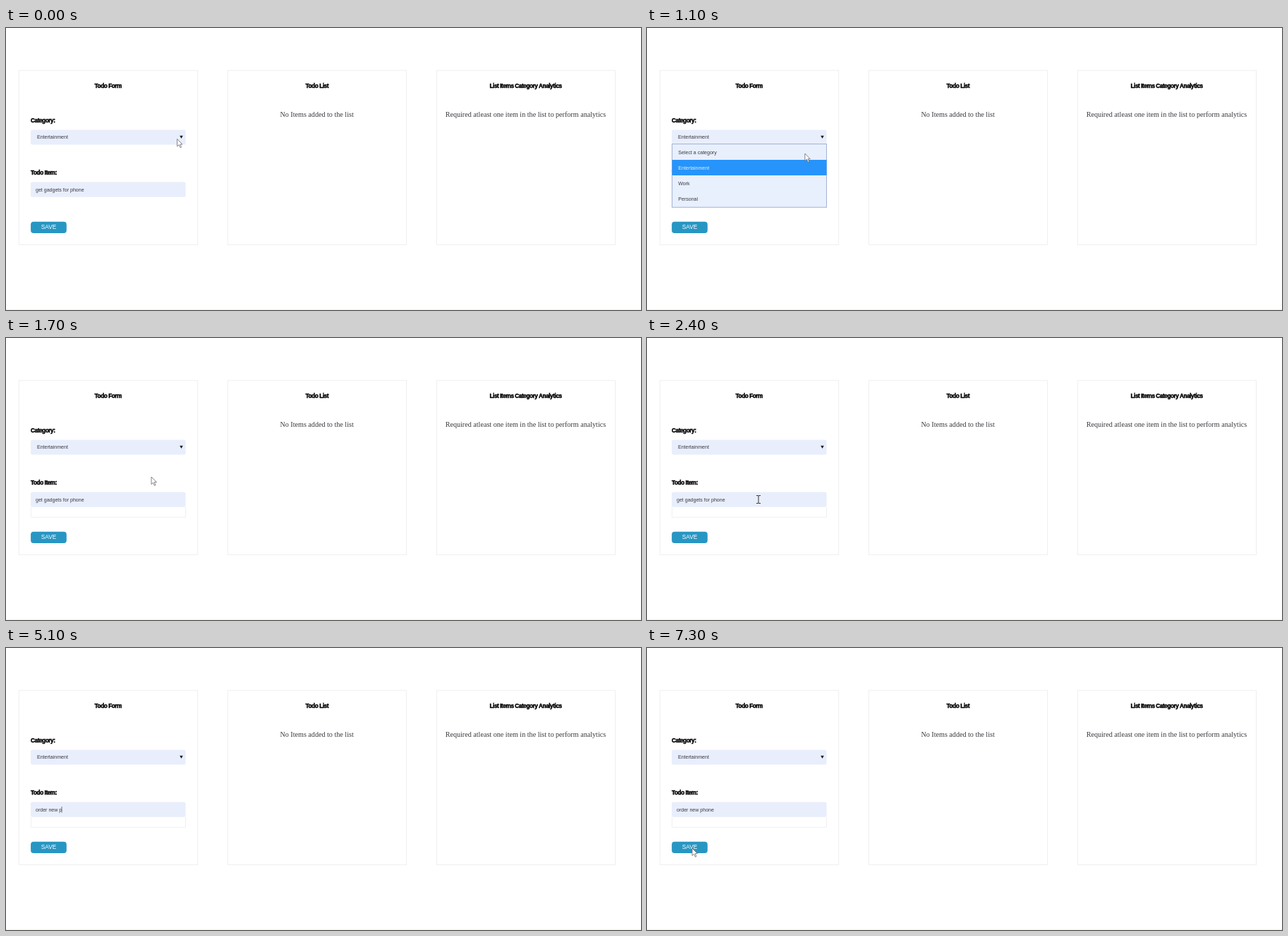
Animation of 900 by 400 pixels, one loop 8 s. Source, as an HTML page:

```html
<!DOCTYPE html>
<html lang="en">
<head>
<meta charset="utf-8">
<title>Todo form</title>
<style>
  html, body { margin: 0; width: 100%; height: 100%; overflow: hidden; background: #fff; }
  svg { display: block; width: 100%; height: 100%; }
  text { font: 7.05px "Liberation Sans", Arial, sans-serif; fill: #3a3a40; white-space: pre; }
  .title { font-size: 8.2px; font-weight: bold; letter-spacing: -.42px; fill: #000; stroke: #000; stroke-width: .45px; }
  .note { font: 10.15px "Liberation Serif", Times, serif; }
  .middle { text-anchor: middle; }
  .field { fill: #e8eefc; }
  .card { fill: none; stroke: #efefef; }
</style>
</head>
<body>
<svg viewBox="0 0 900 400">
  <rect y="398.6" width="900" height="1.4" fill="#f7f7e2"/>

  <rect class="card" x="18.3" y="60.2" width="253.4" height="247.2"/>
  <rect class="card" x="314.3" y="60.2" width="253.2" height="247.2"/>
  <rect class="card" x="610.3" y="60.2" width="253.2" height="247.2"/>
  <text class="title middle" x="144.8" y="85.3">Todo Form</text>
  <text class="title middle" x="440.8" y="85.3">Todo List</text>
  <text class="title middle" x="736.6" y="85.3">List Items Category Analytics</text>
  <text class="note middle" x="440.6" y="125.5">No Items added to the list</text>
  <text class="note middle" x="736.4" y="125.5">Required atleast one item in the list to perform analytics</text>

  <path id="outline" d="M35.5 240V254.3H254.5V240" fill="none" stroke="#f0f0f0"/>

  <text class="title" x="35" y="134.3">Category:</text>
  <rect class="field" x="35" y="144.5" width="219.6" height="21" rx="2.5"/>
  <text x="44" y="157.4">Entertainment</text>
  <path d="M246.2 152.8h4.6l-2.3 4z" fill="#111"/>

  <text class="title" x="35" y="208">Todo Item:</text>
  <rect class="field" x="35" y="218.6" width="219.6" height="21.2" rx="2.5"/>
  <rect id="selection" x="42" y="225" height="8.5" fill="#3390ff"/>
  <text id="item" x="42" y="231.7"></text>
  <rect id="caret" y="225" width=".8" height="8.5" fill="#555"/>

  <rect x="35.1" y="274.8" width="50.7" height="16.3" rx="4" fill="#2896c3"/>
  <text class="middle" x="60.6" y="285.3" style="font-size:8.3px;fill:#fff">SAVE</text>

  <g id="menu">
    <rect x="35.5" y="164.5" width="219" height="89.8" fill="#e8effd" stroke="#a3b2d3"/>
    <rect x="35.5" y="187" width="219" height="22" fill="#2694fb"/>
    <text x="44.3" y="178.7">Select a category</text>
    <text x="44.3" y="200.9" style="fill:#e4f1ff">Entertainment</text>
    <text x="44.3" y="223">Work</text>
    <text x="44.3" y="245.2">Personal</text>
  </g>

  <path id="arrow" d="M0 0V10.5L2.5 8.2L4.4 12.3L6 11.6L4.2 7.6H7.4Z" fill="#fff" stroke="#666" stroke-width=".8"/>
  <path id="beam" d="M-3-5.5H-.8L0-5L.8-5.5H3M0-5V5M-3 5.5H-.8L0 5L.8 5.5H3" fill="none" stroke="#333"/>
</svg>
<script>
const LOOP = 8000, STEP = 100;
const OLD_ITEM = "get gadgets for phone", NEW_ITEM = "order new phone";
const keyTimes = [3100, 3400, 3500, 3700, 3800, 4000, 4100, 4300, 4400, 4600, 4900, 5200, 5400, 5500, 5600];
// Pointer path: time, x, y
const path = [
  [0, 242.6, 157.4], [700, 242.6, 157.4], [1300, 214.5, 188.4], [1600, 206, 197], [1800, 206, 197],
  [2400, 158, 229], [2700, 102, 228], [6300, 102, 228], [7200, 64, 284], [LOOP, 64, 284]
];
const $ = id => document.getElementById(id);
const show = (id, visible) => $(id).style.display = visible ? "" : "none";
const between = (t, from, to) => t >= from && t < to;

function pointerAt(t) {
  const i = path.findIndex(p => p[0] > t);
  const [t0, x0, y0] = path[i - 1], [t1, x1, y1] = path[i];
  const k = (t - t0) / (t1 - t0);
  return [x0 + (x1 - x0) * k, y0 + (y1 - y0) * k];
}

function draw(t) {
  const menuOpen = between(t, 600, 1700);
  show("menu", menuOpen);
  show("outline", t >= 1700);

  const item = $("item"), selected = between(t, 2700, 3100);
  const typed = keyTimes.filter(k => k <= t).length;
  item.textContent = typed ? NEW_ITEM.slice(0, typed) : OLD_ITEM;
  item.style.fill = selected ? "#fff" : "";
  const width = item.getComputedTextLength();
  $("selection").setAttribute("width", width);
  show("selection", selected);
  $("caret").setAttribute("x", 42 + width - .6);
  show("caret", between(t, 400, 600) || between(t, 3100, 6200) || between(t, 6700, 7300));

  const [x, y] = pointerAt(t);
  const visible = !between(t, 3100, 6400);
  const overInput = !menuOpen && between(y, 218.5, 240);
  for (const id of ["arrow", "beam"]) {
    $(id).setAttribute("transform", `translate(${x} ${y})`);
    show(id, visible && (id === "beam") === overInput);
  }
}

const start = performance.now();
function tick() {
  const t = (performance.now() - start) % LOOP;
  draw(Math.floor(t / STEP) * STEP);
  requestAnimationFrame(tick);
}
tick();
</script>
</body>
</html>
```
